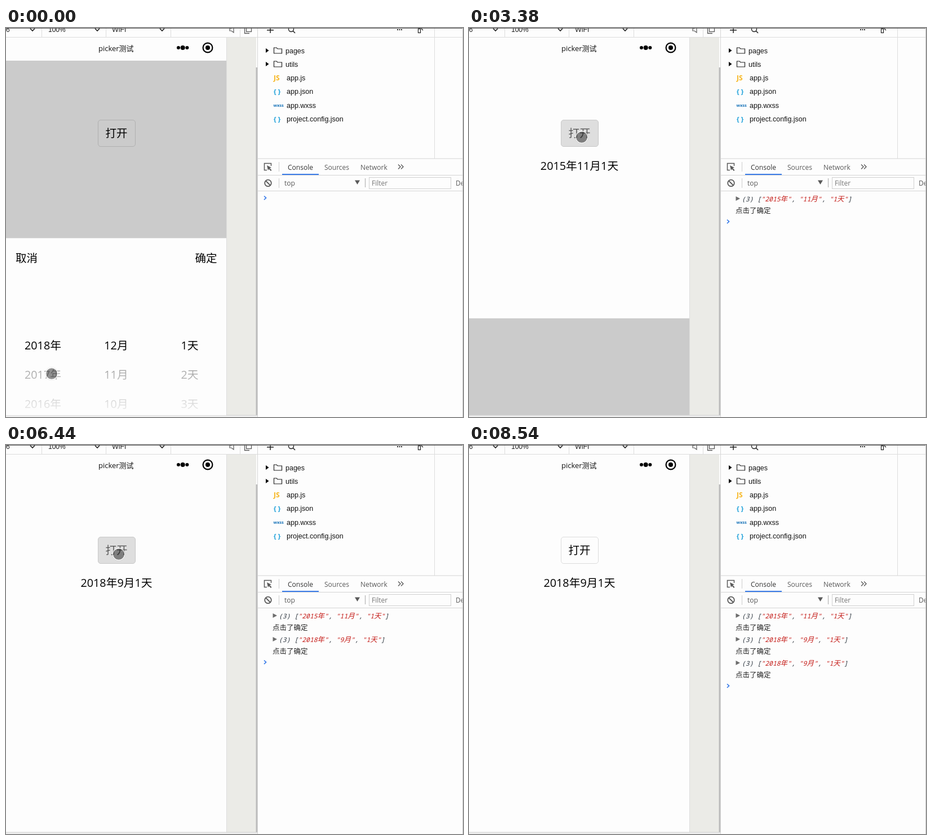
Write an HTML page with a canvas that moves like this. It is 811 by 691 pixels and loops after 9380 ms.

```html
<!DOCTYPE html>
<html lang="zh">
<head>
<meta charset="utf-8">
<title>picker</title>
<style>
html, body { margin: 0; width: 100%; height: 100%; overflow: hidden; background: #fdfdfd; }
canvas { display: block; width: 811px; height: 691px; }
</style>
</head>
<body>
<canvas id="stage" width="811" height="691"></canvas>
<script>
const ctx = document.getElementById('stage').getContext('2d');
const LOOP = 9380, STEP = LOOP / 70;
const PAPER = '#fdfdfd', GRAY = '#5a5a5a', LINE = '#ddd', BLUE = '#3b7de9';
const CJK = '"Noto Sans CJK SC", "Noto Sans CJK", "Noto Sans CJK JP", sans-serif';
const UI = '"Open Sans", ' + CJK;
const ARIAL = '"Liberation Sans", Arial, sans-serif';
const MONO = '"Noto Sans Mono", "DejaVu Sans Mono", monospace';

const ROW = 52, MID = 564, GRAB = 600, SLIDE = 495;
const BUTTON = { x: 200, y: 194 }, CONFIRM = { x: 350, y: 408 };
const YEAR = { x: 65.5, count: 30, label: i => 2018 - i + '年' };
const MONTH = { x: 195.5, count: 12, label: i => 12 - i + '月' };
const DAY = { x: 326, count: 31, label: i => 1 + i + '天' };
const drag = (col, at, time, rows) => ({ col, at, time, rows });

// Each use of the picker: opened, dragged, confirmed, pointer leaves
const RUNS = [
  { open: -1000, close: 2270, leave: 2690, value: ['2015年', '11月', '1天'],
    drags: [drag(YEAR, 160, 540, 3), drag(MONTH, 1250, 290, 1)] },
  { open: 3300, close: 5500, leave: 5910, value: ['2018年', '9月', '1天'],
    drags: [drag(MONTH, 3907, 275, 3), drag(DAY, 4593, 537, 2)] },
  { open: 6500, close: 8100, leave: 8240, value: ['2018年', '9月', '1天'],
    drags: [drag(YEAR, 7206, 290, 2)] }
];

const clamp = k => Math.min(1, Math.max(0, k));
const easeOut = (k, power) => 1 - (1 - clamp(k)) ** power;
const stop = (t, { x, y }) => ({ t, x, y });

function pointerPath() {
  const path = [stop(0, { x: 81, y: 614 }), stop(3618, { x: 259, y: 615 }), stop(8440, { x: 734, y: 706 })];
  for (const { open, close, leave, drags } of RUNS) {
    if (open > 0) path.push(stop(open - 100, BUTTON), stop(open + 60, BUTTON));
    for (const { col, at, time, rows } of drags)
      path.push(stop(at, { x: col.x, y: GRAB }), stop(at + time, { x: col.x, y: GRAB - rows * ROW }));
    path.push(stop(close - 280, CONFIRM), stop(leave, CONFIRM));
  }
  return path.sort((a, b) => a.t - b.t);
}
const PATH = pointerPath();

function rect(x, y, w, h, color) {
  ctx.fillStyle = color;
  ctx.fillRect(x, y, w, h);
}

function box(x, y, w, h, color, width = 1) {
  ctx.strokeStyle = color;
  ctx.lineWidth = width;
  ctx.strokeRect(x, y, w, h);
}

function text(s, x, y, font, color = '#000', align = 'left') {
  ctx.font = font;
  ctx.fillStyle = color;
  ctx.textAlign = align;
  ctx.fillText(s, x, y);
}

function paint(color, width) {
  ctx.fillStyle = ctx.strokeStyle = color;
  ctx.lineWidth = width || 1;
  width ? ctx.stroke() : ctx.fill();
}

function poly(points, color, width, close) {
  ctx.beginPath();
  points.forEach(([x, y]) => ctx.lineTo(x, y));
  if (close) ctx.closePath();
  paint(color, width);
}

function circle(x, y, r, color, width) {
  ctx.beginPath();
  ctx.arc(x, y, r, 0, Math.PI * 2);
  paint(color, width);
}

// Open angle or, without a width, a filled triangle
const pointRight = (x, y, w, h, color, width) => poly([[x, y - h], [x + w, y], [x, y + h]], color, width);
const pointDown = (x, y, w, h, color, width) => poly([[x - w, y], [x, y + h], [x + w, y]], color, width);

function drawTopBar() {
  text('6', 0, 7, '12px ' + ARIAL, '#222');
  text('100%', 75, 7, '12px ' + ARIAL, '#222');
  text('WiFi', 188, 7, '12.5px ' + ARIAL, '#222');
  for (const x of [47, 162, 277]) pointDown(x, 1, 4, 4, '#222', 1.6);
  for (const x of [63, 177, 292, 415]) rect(x, 0, 1, 16, LINE);
  poly([[397, 1], [400, 1], [404, -2], [404, 8], [400, 5], [397, 5]], GRAY, 1.2, true);
  box(426.5, -2.5, 9, 9, GRAY, 1.3);
  poly([[423.5, 1], [423.5, 9.5], [432, 9.5]], GRAY, 1.3);
  rect(0, 16, 811, 1, LINE);
  rect(463, 3, 12, 1.5, '#222');
  rect(468.3, 0, 1.5, 9, '#222');
  circle(506, 2, 4.5, '#222', 1.4);
  poly([[509, 5], [513, 9]], '#222', 1.6);
  for (let i = 0; i < 3; i++) rect(694 + i * 3.5, 2, 2, 2, '#222');
  box(731.5, 1.5, 4, 7, '#222', 1.2);
  poly([[737, 1], [740, 4]], '#222', 1.2);
}

function drawFrame() {
  rect(391, 17, 1, 671, LINE);
  rect(392, 17, 52, 671, '#ebebe7');
  rect(443.5, 70, 2.5, 618, '#bcbcbc');
  rect(446, 0, 1, 691, '#d6d6d6');
  rect(0, 688, 446, 3, '#f0f0f0');
  rect(0, 687.5, 446, 1, '#cfcfcf');
}

function drawFiles() {
  const font = '12.5px ' + ARIAL;
  ['pages', 'utils'].forEach((name, i) => {
    const y = 40 + i * 24;
    pointRight(461, y, 5.5, 4, '#000');
    poly([[475.5, y - 5], [480, y - 5], [482, y - 3], [489.5, y - 3], [489.5, y + 5], [475.5, y + 5]], '#222', 1.2, true);
    text(name, 496, y + 4.5, font, '#111');
  });
  ['app.js', 'app.json', 'app.wxss', 'project.config.json'].forEach((name, i) => {
    const y = 93 + i * 24.4;
    text(name, 498, y, font, '#111');
    if (name.endsWith('.js')) text('JS', 475, y, 'bold 12px ' + UI, '#f7b51c');
    else if (name.endsWith('.json')) text('{ }', 475, y - 0.7, 'bold 11.5px ' + ARIAL, '#1a9fd9');
    else text('wxss', 474.5, y - 2, 'bold 7.5px ' + UI, '#1672b8');
  });
  rect(760, 0, 1, 232, LINE);
}

function drawDevTools() {
  const font = '12px ' + UI;
  for (const y of [231.5, 261, 289]) rect(447, y, 364, 1, '#d4d4d4');
  poly([[463, 252.5], [458.5, 252.5], [458.5, 240.5], [470.5, 240.5], [470.5, 245]], GRAY, 1.5);
  poly([[463, 244], [471, 248], [468, 249], [471.5, 252.5], [470, 254], [466.5, 250.5], [465, 253]], GRAY);
  text('Console', 500, 251.5, font, '#333');
  text('Sources', 565, 251.5, font, GRAY);
  text('Network', 629, 251.5, font, GRAY);
  for (const x of [696, 701]) pointRight(x, 246.5, 4, 4, GRAY, 1.4);
  rect(490, 259, 65, 2, BLUE);
  circle(465, 275.5, 5.8, GRAY, 1.8);
  poly([[461, 271.5], [469, 279.5]], GRAY, 1.8);
  for (const y of [238, 267]) rect(484, y, 1, 17, '#ccc');
  text('top', 494, 280, font, GRAY);
  pointDown(623.5, 270.5, 4.5, 7.5, GRAY);
  rect(637, 267, 1, 16, '#aaa');
  box(644.5, 265.5, 145, 20, '#d0d0d0');
  text('Filter', 649, 280, font, '#757575');
  text('De', 798, 280, font, GRAY);
}

function drawLog(value, y) {
  let x = 484;
  const write = (s, color) => {
    for (const c of s) {
      text(c, x, y + 4.5, c > '\u2000' ? 'italic 12.5px ' + CJK : 'italic 11.45px ' + MONO, color);
      x += ctx.measureText(c).width;
    }
  };
  pointRight(473.5, y, 7.5, 4, '#6e6e6e');
  write('(3) [', '#303942');
  value.forEach((part, i) => {
    if (i) write(', ', '#303942');
    write(`"${part}"`, '#c41a16');
  });
  write(']', '#303942');
  text('点击了确定', 473, y + 25.5, '12.5px ' + CJK, '#222');
}

function drawConsole(done) {
  done.forEach((run, i) => drawLog(run.value, 303 + i * 42));
  pointRight(458, 301.8 + done.length * 42, 3.5, 3.3, BLUE, 1.7);
}

function drawPage(done, pressed) {
  text('picker测试', 164, 41, '13px ' + UI, '#111');
  for (const i of [-1, 0, 1]) circle(313.7 + i * 7.7, 35, i ? 3 : 4, '#000');
  circle(358, 35, 8.4, '#000', 2.2);
  circle(358, 35, 4, '#000');
  ctx.beginPath();
  ctx.roundRect(163.5, 163.5, 66, 47, 4.5);
  paint(pressed ? '#dedede' : PAPER);
  paint(pressed ? '#c8c8c8' : '#dcdcdc', 1);
  text('打开', 196, 194, '19.5px ' + UI, pressed ? 'rgba(0,0,0,.6)' : '#000', 'center');
  if (done.length) text(done.at(-1).value.join(''), 196, 252, '19.75px ' + UI, '#000', 'center');
}

function fade(y0, y1, a0, a1) {
  const g = ctx.createLinearGradient(0, y0, 0, y1);
  g.addColorStop(0, `rgba(253,253,253,${a0})`);
  g.addColorStop(1, `rgba(253,253,253,${a1})`);
  rect(0, y0, 391, y1 - y0, g);
}

function drawColumn(col, scroll) {
  for (let i = 0; i < col.count; i++) {
    const y = MID + (i - scroll) * ROW;
    if (Math.abs(y - MID) < 2.6 * ROW) text(col.label(i), col.x, y + 7, '19.75px ' + UI, '#000', 'center');
  }
}

function drawPicker(run, t) {
  ctx.save();
  ctx.beginPath();
  ctx.rect(0, 58, 391, 629.5);
  ctx.clip();
  ctx.translate(0, 630 * (1 - easeOut((t - run.open) / SLIDE, 3)));
  rect(0, 58, 391, 315.5, 'rgba(0,0,0,.2)');
  rect(0, 373.5, 391, 315, PAPER);
  ctx.beginPath();
  ctx.rect(0, 441, 391, 247);
  ctx.save();
  ctx.clip();
  for (const col of [YEAR, MONTH, DAY]) {
    const d = run.drags.find(d => d.col === col);
    // The wheel keeps rolling a little after the finger lets go
    drawColumn(col, d ? d.rows * easeOut((t - d.at) / (d.time * 1.5), 3) : 0);
  }
  ctx.restore();
  fade(441, 538, 0.95, 0.6);
  fade(590, 688, 0.6, 0.95);
  text('取消', 17, 416, '19.5px ' + UI);
  text('确定', 374.5, 416, '19.5px ' + UI, '#000', 'right');
  ctx.restore();
}

function drawPointer(t) {
  const next = PATH.findIndex(p => p.t > t);
  if (next < 0) return;
  const a = PATH[next - 1], b = PATH[next];
  const k = easeOut((t - a.t) / (b.t - a.t), 2);
  const x = a.x + (b.x - a.x) * k, y = a.y + (b.y - a.y) * k;
  circle(x, y, 11.6, 'rgba(0,0,0,.12)', 0.8);
  circle(x, y, 10.6, 'rgba(255,255,255,.75)', 1.6);
  circle(x, y, 9.8, 'rgba(0,0,0,.43)');
}

function frame(now) {
  const t = now % LOOP;
  const held = Math.floor(t / STEP) * STEP;
  const done = RUNS.filter(run => t >= run.close);
  const pressed = RUNS.some(run => t >= run.open - 90 && t < run.open + 190);
  const active = RUNS.find(run => t >= run.open && t < run.close);
  rect(0, 0, 811, 691, PAPER);
  drawTopBar();
  drawFrame();
  drawFiles();
  drawDevTools();
  drawConsole(done);
  drawPage(done, pressed);
  if (active) drawPicker(active, held);
  drawPointer(held);
  rect(0, 0, 811, 1, '#5c5c5c');
  rect(810, 0, 1, 691, '#ccc');
}

const start = performance.now();
function tick() {
  frame(performance.now() - start);
  requestAnimationFrame(tick);
}
tick();
</script>
</body>
</html>
```
